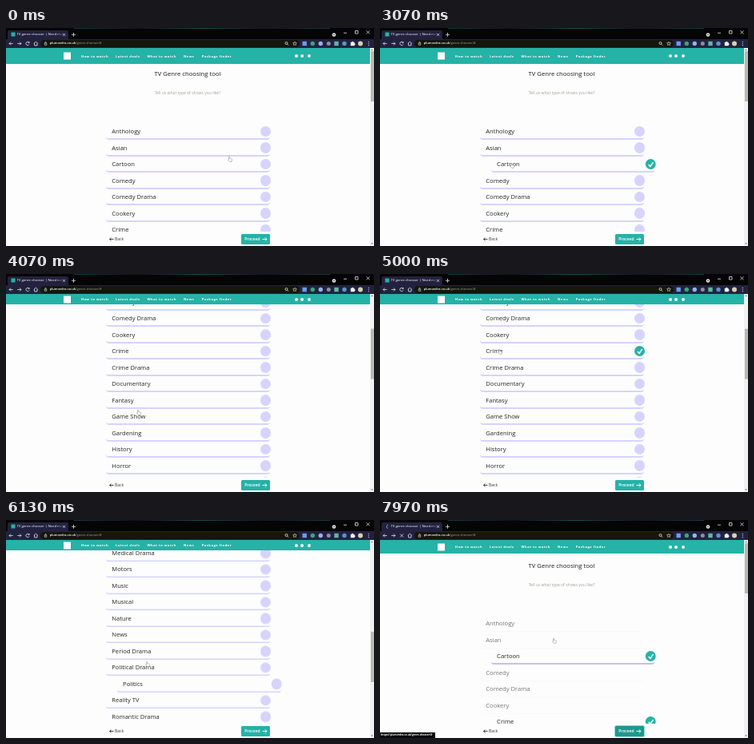
Animation of 460x273 px, one loop 8 s. Source, as an HTML page:

```html
<!DOCTYPE html>
<html lang="en">
<head>
<meta charset="utf-8">
<title>TV genre chooser</title>
<style>
html, body { margin: 0; width: 100%; height: 100%; overflow: hidden; background: #fdfdfe; }
#stage { position: relative; width: 460px; height: 273px; overflow: hidden; background: #fdfdfe;
  font-family: "Open Sans", "Noto Sans", sans-serif; color: #333; --teal: #25b2a7; --lilac: #d6d4fc; }
#stage * { box-sizing: border-box; }
#stage div, #stage svg, #stage span { position: absolute; white-space: nowrap; }
.loop, .row, .row span, .row i { animation: 8s linear infinite; }

/* page */
#page { left: 0; top: 0; width: 455px; height: 273px; animation-name: scroll; }
h1, p { position: absolute; margin: 0; left: 0; width: 454px; text-align: center; }
h1 { top: 51px; font-size: 7.7px; line-height: 12px; font-weight: 500; color: #1c1c1c; }
p { top: 76px; font-size: 5.05px; line-height: 10px; color: #a0a096; }
.row { left: 125px; width: 205px; height: 20.5px; border-bottom: 2px solid var(--lilac); border-radius: 4px; }
.row span { left: 7.3px; top: 3.8px; font-size: 7.6px; line-height: 12px; font-weight: 500; color: #262626; }
.row i { position: absolute; left: 192.5px; top: 3.1px; width: 13.6px; height: 13.6px; border-radius: 50%; background: var(--lilac); }
.row svg { left: 0; top: 0; width: 100%; height: 100%; fill: none; stroke: #fff; stroke-width: 1.6; }
.row.plain { animation-name: dimLine; }
.row.plain span { animation-name: dimText; }
.row.plain i { animation-name: dimDot; }

@keyframes scroll {
  0%, 4.5% { transform: translateY(0); }
  11% { transform: translateY(-230px); }
  18.5%, 22% { transform: translateY(-693px); }
  26% { transform: translateY(-330px); }
  30.5%, 44.25% { transform: translateY(0); animation-timing-function: ease-in; }
  47.5% { transform: translateY(-90px); animation-timing-function: ease-out; }
  51%, 65.25% { transform: translateY(-156px); }
  69.625% { transform: translateY(-344px); }
  73% { transform: translateY(-408px); animation-timing-function: ease-out; }
  77%, 94.5% { transform: translateY(-437px); }
  94.51%, 100% { transform: translateY(0); }
}
@keyframes thumb {
  0%, 4.5% { transform: translateY(0); }
  11% { transform: translateY(58.4px); }
  18.5%, 22% { transform: translateY(176px); }
  26% { transform: translateY(83.8px); }
  30.5%, 44.25% { transform: translateY(0); animation-timing-function: ease-in; }
  47.5% { transform: translateY(22.9px); animation-timing-function: ease-out; }
  51%, 65.25% { transform: translateY(39.6px); }
  69.625% { transform: translateY(87.4px); }
  73% { transform: translateY(103.6px); animation-timing-function: ease-out; }
  77%, 94.5% { transform: translateY(111px); }
  94.51%, 100% { transform: translateY(0); }
}
@keyframes shrink {
  0%, 6% { height: 20px; }
  10%, 28% { height: 13px; }
  32%, 45% { height: 20px; }
  47.5% { height: 17px; }
  50%, 95.5% { height: 13px; }
  99.6%, 100% { height: 17px; }
}
@keyframes dimLine {
  0%, 81.5% { border-bottom: 2px solid #d6d4fc; }
  85%, 94.5% { border-bottom: 1px solid #cfcdf3; }
  94.51%, 100% { border-bottom: 1px solid #d6d4fc18; }
}
@keyframes dimText { 0%, 81.5% { color: #262626; } 85%, 100% { color: #777; } }
@keyframes dimDot { 0%, 81.5% { opacity: 1; } 85%, 100% { opacity: 0; } }

/* bars around the page */
#nav { left: 0; top: 25px; width: 455px; height: 20px; background: var(--teal); animation-name: shrink; }
#nav span { top: calc(50% + .6px); transform: translateY(-50%); color: #fff; font-size: 4.2px; line-height: 6px; font-weight: 700; letter-spacing: .45px; }
#nav b { position: absolute; top: calc(50% + .4px); transform: translateY(-50%); background: #fff; }
#foot { left: 0; top: 255px; width: 455px; height: 18px; background: #fdfdfe; }
#foot span { font-size: 5px; line-height: 8px; }
#foot svg { left: 0; top: 0; fill: none; stroke-width: .9; }
#proceed { left: 293.5px; top: 3px; width: 36.5px; height: 13px; border-radius: 1.5px; background: var(--teal); color: #fff; animation-name: press; }
@keyframes press {
  0%, 90.2% { background: #25b2a7; box-shadow: none; }
  91.5%, 94% { background: #1f988e; box-shadow: none; }
  94.5%, 100% { background: #1f988e; box-shadow: 0 0 0 1px #94d8d2; }
}
#track { left: 455px; top: 25px; width: 5px; height: 248px; background: #f1f1f1; }
#thumb { left: .5px; top: 4px; width: 4.5px; height: 63px; background: #b8b8b3; animation-name: thumb; }
#track svg { left: 0; top: 0; }
#status { left: 0; top: 266px; width: 69px; height: 7px; background: #080808; color: #fff; font-size: 3.1px; line-height: 7px; font-weight: 700; padding-left: 1px; overflow: hidden; animation-name: late; }
@keyframes late { 0%, 90.5% { opacity: 0; } 90.51%, 100% { opacity: 1; } }

/* browser */
#chrome { left: 0; top: 0; width: 460px; height: 25px; background: #050506; color: #fff; }
#chrome svg { left: 0; top: 0; fill: none; stroke: #e4e4ea; stroke-width: .8; }
#tab { left: 2px; top: 3px; width: 76px; height: 12px; border-radius: 2px 2px 0 0; background: #22223f; }
#tabText { left: 11.5px; top: .4px; width: 58px; overflow: hidden; font-size: 4.25px; line-height: 8px; font-weight: 500; -webkit-mask: linear-gradient(90deg, #000 85%, transparent); mask: linear-gradient(90deg, #000 85%, transparent); }
#tools { left: 0; top: 14px; width: 460px; height: 11px; background: #22223f; }
#url { left: 43px; top: .7px; width: 324px; height: 9.4px; border-radius: 5px; background: #16160c; }
#url span { left: 11.7px; top: .7px; font-size: 4px; line-height: 8px; font-weight: 600; }
#url em { font-style: normal; font-weight: 400; color: #a4a4a4; }
.idle { animation-name: idle; }
.busy { animation-name: busy; }
@keyframes idle { 0%, 94.5% { opacity: 1; } 94.51%, 100% { opacity: 0; } }
@keyframes busy { 0%, 94.5% { opacity: 0; } 94.51%, 100% { opacity: 1; } }

/* pointer */
#pointer { left: -4px; top: -4px; width: 8px; height: 8px; animation-name: move; animation-timing-function: ease-in-out; }
#pointer svg { left: 0; top: 0; }
#hand { animation-name: hand; }
#stop { animation-name: stop; }
@keyframes move {
  0%, 28% { transform: translate(280px, 164px); }
  33.5%, 46% { transform: translate(165px, 172px); }
  47.5%, 54% { transform: translate(166px, 173px); }
  60%, 64% { transform: translate(150px, 97px); }
  68%, 74% { transform: translate(185px, 158px); }
  79.5%, 83% { transform: translate(168px, 206px); }
  88.75% { transform: translate(266px, 258px); }
  91.5%, 95.5% { transform: translate(312px, 266px); }
  99.625%, 100% { transform: translate(218px, 151px); }
}
@keyframes hand { 0%, 84.5% { opacity: 1; } 84.51%, 90% { opacity: 0; } 90.01%, 100% { opacity: 1; } }
@keyframes stop { 0%, 84.5% { opacity: 0; } 84.51%, 90% { opacity: 1; } 90.01%, 100% { opacity: 0; } }
</style>
</head>
<body>
<div id="stage">
  <div id="page" class="loop">
    <h1>TV Genre choosing tool</h1>
    <p>Tell us what type of shows you like?</p>
  </div>

  <div id="foot">
    <svg width="455" height="18" stroke="#333"><path d="M134.5 9.5h-5m2-2-2 2 2 2"/></svg>
    <span style="left:136px;top:5.3px">Back</span>
    <div id="proceed" class="loop">
      <span style="left:4.7px;top:2.3px;font-weight:600">Proceed</span>
      <svg width="37" height="13" stroke="#fff"><path d="M26.5 6.5h5.5m-2.3-2.3 2.3 2.3-2.3 2.3"/></svg>
    </div>
  </div>

  <div id="nav" class="loop">
    <b style="left:72px;width:9px;height:9px"></b>
    <span style="left:94px">How to watch</span>
    <span style="left:137px">Latest deals</span>
    <span style="left:176.5px">What to watch</span>
    <span style="left:222px">News</span>
    <span style="left:244.7px">Package finder</span>
    <b style="left:360.5px;width:4px;height:4px;border-radius:50%"></b>
    <b style="left:368px;width:4px;height:4px;border-radius:50%"></b>
    <b style="left:377px;width:4px;height:4px;border-radius:50%"></b>
  </div>

  <div id="track">
    <div id="thumb" class="loop"></div>
    <svg width="5" height="248" fill="#666"><path d="M1.2 3 2.5 1.5 3.8 3zM1.2 244.5l1.3 1.5 1.3-1.5z"/></svg>
  </div>

  <div id="chrome">
    <div style="left:85px;top:0;width:320px;height:1px;background:linear-gradient(90deg,#123c40,#10131c,#1b4a52,#12151f,#163a49)"></div>
    <div id="tab"><div id="tabText">TV genre chooser | Need more help</div></div>
    <div id="tools"><div id="url"><span>plumvedra.co.uk<em>/genre-chooser/#</em></span></div></div>
    <svg width="460" height="25">
      <rect class="loop idle" x="6.5" y="5.5" width="5" height="5" fill="#25b2a7" stroke="none"/>
      <path class="loop busy" d="M10 6a2.4 2.4 0 0 0 0 4.6" stroke="#8fb4ff"/>
      <path d="M71 6.8l3 3m0-3-3 3M82 8.3h5m-2.5-2.5v5M422 6.2h4M436.5 3.5h3.5v3.5h-3.5zM450.5 3.3l4 4m0-4-4 4"/>
      <circle cx="410" cy="8.5" r="2.3" fill="#e8e8ec" stroke="none"/>
      <path d="M409 8l1 1 1-1" stroke="#222"/>
      <path d="M8.7 19.5H4m2-2-2 2 2 2M14.3 19.5H19m-2-2 2 2-2 2M34.8 19.3l2.5-2.1 2.5 2.1m-4.2-.4v3h3.4v-3"/>
      <path class="loop idle" d="M28.9 18.2a2.2 2.2 0 1 0 .2 2.2m0-3.4v1.6h-1.6"/>
      <path class="loop busy" d="M25.2 17.5l4 4m0-4-4 4"/>
      <path d="M48.2 19.1h2.6v2.2h-2.6zm.6 0v-1a.7.7 0 0 1 1.4 0v1" stroke-width=".6"/>
      <circle cx="350.5" cy="19" r="1.5"/><path d="M351.6 20.2l1.5 1.5"/>
      <path d="M361 17l.7 1.5 1.7.2-1.2 1.1.3 1.7-1.5-.8-1.5.8.3-1.7-1.2-1.1 1.7-.2z" stroke-width=".6"/>
      <g stroke="none">
        <rect x="370.5" y="16.8" width="5.4" height="5.4" fill="#6f9be8"/>
        <circle cx="383.3" cy="19.5" r="2.7" fill="#3aa676"/>
        <circle cx="393.3" cy="19.5" r="2.7" fill="#9ab0e8"/>
        <circle cx="403.3" cy="19.5" r="2.5" fill="#8d8fa5"/>
        <rect x="410.3" y="16.8" width="5.4" height="5.4" fill="#62b4a6"/>
        <circle cx="423" cy="19.5" r="2.7" fill="#5f93c9"/>
        <path d="M430.8 17.8h1.5a1 1 0 0 1 2 0h1.3v1.5a1 1 0 0 1 0 2v.9h-4.8z" fill="#f0f0f4"/>
        <circle cx="443" cy="19.5" r="3" fill="#d9cfae"/>
        <g fill="#e4e4ea"><circle cx="453.3" cy="17.3" r=".6"/><circle cx="453.3" cy="19.5" r=".6"/><circle cx="453.3" cy="21.7" r=".6"/></g>
      </g>
    </svg>
  </div>

  <div id="status" class="loop">https://plumvedra.co.uk/genre-chooser/#</div>

  <div id="pointer" class="loop">
    <svg id="hand" class="loop" width="8" height="8"><path d="M2.5 5V1.4q.6-.7 1.2 0v2l2.2.5q.7.2.6 1L6 7.3H3.5L1.5 5.1q.2-.6 1-.1z" fill="#fff" stroke="#7c7c84" stroke-width=".5"/></svg>
    <svg id="stop" class="loop" width="8" height="8" fill="none" stroke="#d8435c" stroke-width=".9"><circle cx="4" cy="4" r="1.8" fill="#fff"/><path d="M2.8 2.8l2.4 2.4"/></svg>
  </div>
</div>
<script>
const LOOP = 8000;
const genres = ("Anthology,Asian,Cartoon,Comedy,Comedy Drama,Cookery,Crime,Crime Drama,Documentary,Fantasy,Game Show," +
  "Gardening,History,Horror,Kids,LGBTQ+,Lifestyle,Medical Drama,Motors,Music,Musical,Nature,News,Period Drama," +
  "Political Drama,Politics,Reality TV,Romantic Drama,Sci-Fi,Science,Sitcom,Soap,Sport,Talk Show,Thriller,Travel,War,Western").split(",");
const picks = { Cartoon: 2800, Crime: 4930, Politics: 6480 };
const pct = ms => (ms / LOOP * 100).toFixed(3) + "%";

// A picked row turns teal at once, then slides to the right.
const pickFrames = (name, t) => `
  @keyframes slide${name} {
    0%, ${pct(t + 70)} { transform: none; border-bottom-color: #d6d4fc; animation-timing-function: ease; }
    ${pct(t + 270)}, 81.5% { transform: translateX(13.8px); border-bottom-color: #d6d4fc; }
    85%, 100% { transform: translateX(13.8px); border-bottom-color: #c3c0f6; }
  }
  @keyframes tick${name} {
    0%, ${pct(t)} { background: #d6d4fc; }
    ${pct(t + 40)}, 100% { background: #25b2a7; }
  }
  @keyframes mark${name} { 0%, ${pct(t)} { opacity: 0; } ${pct(t + 40)}, 100% { opacity: 1; } }`;

const style = document.createElement("style");
style.textContent = Object.entries(picks).map(([name, t]) => pickFrames(name, t)).join("");
document.head.append(style);

const tick = name => `<svg class="loop" style="animation-name:mark${name}" viewBox="0 0 14 14"><path d="M4 7.2l2.2 2.5L10 4.2"/></svg>`;
const row = (name, i) => {
  const picked = name in picks;
  const anim = kind => picked ? `animation-name:${kind}${name}` : "";
  return `<div class="row ${picked ? "" : "plain"}" style="top:${119.7 + i * 20.5}px;${anim("slide")}">
    <span>${name}</span><i style="${anim("tick")}">${picked ? tick(name) : ""}</i></div>`;
};
document.getElementById("page").insertAdjacentHTML("beforeend", genres.map(row).join(""));
</script>
</body>
</html>
```
